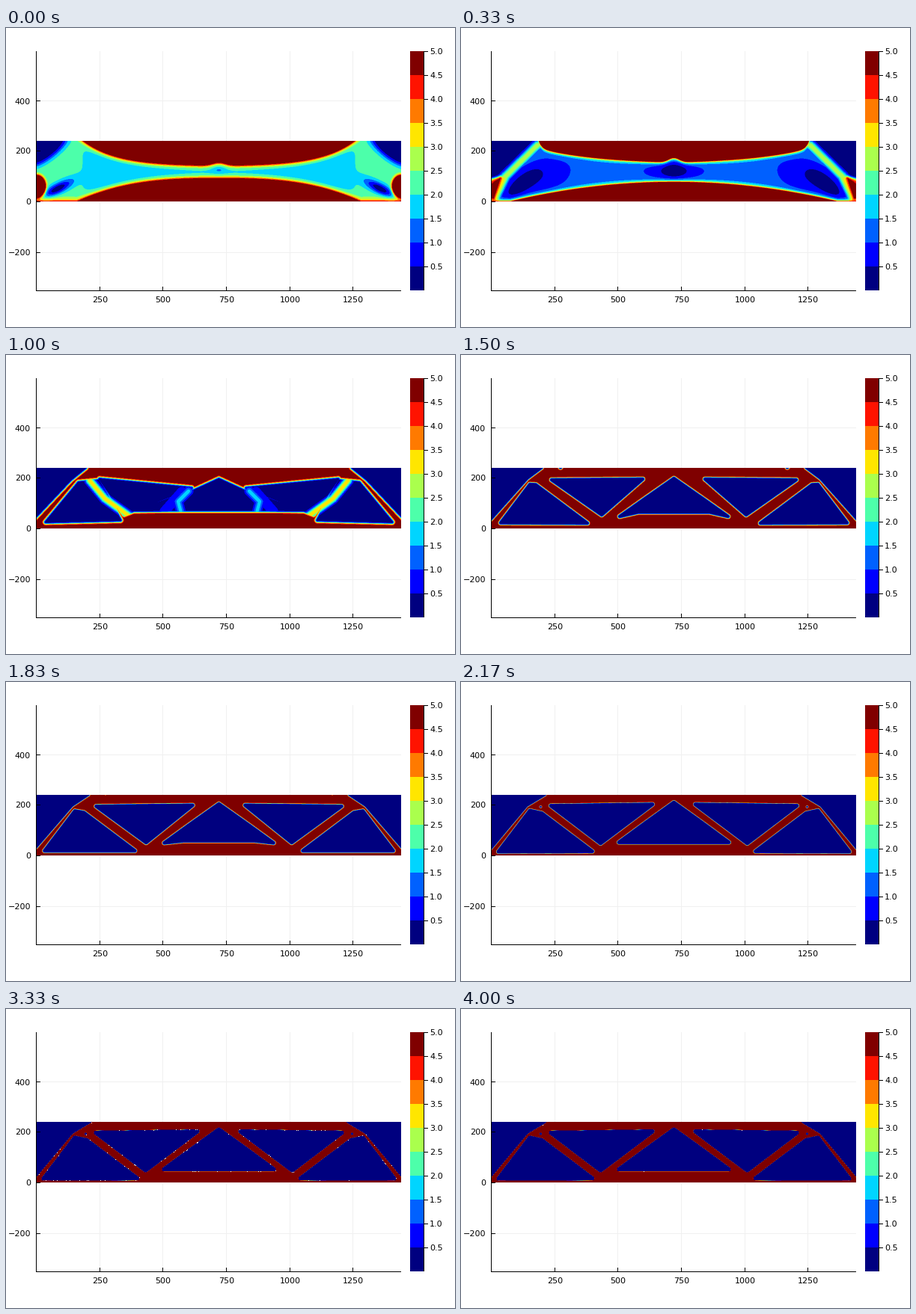
A matplotlib script for the animation above (4.17 s loop, 600 px wide and 400 px high).

```python
import numpy as np
import matplotlib.pyplot as plt
from matplotlib.animation import FuncAnimation

W, H, DPI = 600, 400, 100
PX = 72 / DPI                      # one pixel in points
LOOP, TICK, STEPS = 4170, 30, 25   # ms, ms, pictures per loop
LEFT, RIGHT, TOP, BOTTOM = 41, 528, 151, 232
MID = (LEFT + RIGHT) / 2
SS = 2                             # supersampling of the density field

plt.rcParams["font.family"] = "DejaVu Sans"
COLORS = plt.get_cmap("jet")(np.arange(10) / 9)[:, :3]

# left half of the beam; the right half is its mirror image
X, Y = np.meshgrid(LEFT + (np.arange(RIGHT - LEFT) + 0.5) / SS,
                   TOP + (np.arange((BOTTOM - TOP) * SS) + 0.5) / SS)


def line_dist(pts):
    best = np.full(X.shape, 1e9)
    for (ax, ay), (bx, by) in zip(pts[:-1], pts[1:]):
        dx, dy = bx - ax, by - ay
        t = ((X - ax) * dx + (Y - ay) * dy) / (dx * dx + dy * dy + 1e-9)
        t = np.clip(t, 0, 1)
        best = np.minimum(best, np.hypot(X - ax - t * dx, Y - ay - t * dy))
    return best


def hole(pts, rounding=0):
    """Signed distance to a polygon with rounded corners, negative inside."""
    ring = list(pts) + [pts[0]]
    inside = np.zeros(X.shape, bool)
    for (ax, ay), (bx, by) in zip(ring[:-1], ring[1:]):
        if ay != by:
            inside ^= ((ay > Y) != (by > Y)) & (X < ax + (Y - ay) * (bx - ax) / (by - ay))
    d = line_dist(ring)
    return np.where(inside, -d, d) - rounding


def dot(x, y, r):
    return np.hypot(X - x, Y - y) - r


def radius(cx, cy, rx, ry, deg=0):
    a = np.radians(deg)
    u = (X - cx) * np.cos(a) + (Y - cy) * np.sin(a)
    v = (Y - cy) * np.cos(a) - (X - cx) * np.sin(a)
    return np.hypot(u / rx, v / ry)


def blob(*args):
    return np.exp(-radius(*args) ** 2)


def ridge(pts, width):
    return np.exp(-(line_dist(pts) / width) ** 2)


def sigmoid(z):
    return 1 / (1 + np.exp(-np.clip(z, -60, 60)))


def logit(v):
    v = np.clip(v, 0.02, 4.98)
    return np.log(v / (5 - v))


def flanges(v, top, bottom, s):
    """Raise the density towards the top and bottom chords."""
    up = np.exp(np.clip((top - Y) / s, -30, 0.5))
    low = np.exp(np.clip((Y - np.minimum(bottom, 232)) / s, -30, 0.5))
    return v + np.maximum(4.5 - v, 0) * (up + low)


def first_density():
    v = 2.25 - 0.72 * sigmoid((X - 108) / 9)
    s = (((X - 41) / 46) ** 1.3 + ((Y - 151) / 38) ** 1.3) ** (1 / 1.3)
    v *= sigmoid((s - 0.85) / 0.07)
    v += (0.1 - v) * blob(69, 215, 23, 7, -28)
    v -= 0.4 * blob(MID, 190, 7, 4)
    top = 185 - 33 * np.exp((104 - X) / 45) - 4 * np.exp(-((X - MID) / 12) ** 2)
    bottom = 201 + 31 * ((MID - X) / 190) ** 2.8
    v = flanges(v, top, bottom, 3.3)
    return v + 5 * sigmoid((1 - radius(41, 212, 12, 15)) / 0.1)


def second_density():
    v = 1.25 - 0.5 * blob(MID, 191, 48, 14) - 0.7 * blob(MID, 191, 19, 11)
    v -= 0.62 * blob(108, 200, 42, 22, -20) + 0.9 * blob(79, 210, 30, 11, -40)
    v = np.maximum(v, 0.1)
    v *= sigmoid((X - LEFT + Y - TOP - 58) / 2)
    v = np.maximum(v, 2.9 * ridge([(44, 231), (60, 198), (102, 157)], 6.5))
    top = (182 - 19 * np.exp((112 - X) / 80) - 10 * np.exp((104 - X) / 4)
           - 6 * np.exp(-((X - MID) / 10) ** 2))
    bottom = 206 + 25 * ((MID - X) / 214) ** 2
    v = flanges(v, top, bottom, 1.9)
    return v + 4 * sigmoid(-hole([(36, 205), (52, 201), (42, 226)], 2) / 1.2)


# Corners of each opening while the struts appear, join up and settle.
OUTER = np.array([[(109, 152), (88, 169), (41, 219)],
                  [(110, 152), (90, 167), (41, 222)],
                  [(114, 152), (89, 167), (41, 224.5)]])
FOOT = np.array([[(53, 223.5), (97, 170.5), (124, 168), (153, 221)],
                 [(53, 224.5), (92, 173), (100, 173.5), (169, 225)],
                 [(50, 227), (92, 172), (108, 175.5), (175.5, 226.5)]])
UPPER = np.array([[(125, 166), (248, 178), (158, 213)],
                  [(121, 167), (243, 166), (188, 214)],
                  [(120, 165.5), (256, 163.7), (186.5, 216)]])
MIDDLE = np.array([[(MID, 166), (252, 181), (172, 208), (237, 207.5)],
                   [(MID, 165), (243, 194), (212, 216), (237, 210.3)],
                   [(MID, 161), (247, 188), (211, 214.5), (237, 214.5)]])


def pose(shape, p):
    i = min(int(p), 1)
    return shape[i] + (shape[i + 1] - shape[i]) * (p - i)


def truss(k, width):
    p = np.interp(k, [6, 9, 13], [0, 1, 2])
    outer = [tuple(c) for c in pose(OUTER, p)]
    middle = pose(MIDDLE, p)
    twin = middle[:0:-1] * (-1, 1) + (2 * MID, 0)
    g = np.minimum.reduce([
        hole([(10, 120), (outer[0][0], 120)] + outer + [(10, outer[2][1] + 36)]),
        hole(pose(FOOT, p), 2.7),
        hole(pose(UPPER, p), 2.7),
        hole(np.vstack([middle, twin]), 2.7),
        dot(133, 150, 3 - 4 * abs(p - 1)),
        dot(106.5, 167, 4 * p - 6.5),
    ])
    if p < 1:
        # half-dense struts and the haze beside them
        fade = 1 - p
        haze = np.maximum.reduce([
            (3.4 + p) * ridge([(112, 168), (132, 192), (164, 215)], 5.5),
            fade * 1.7 * ridge([(244, 182), (230, 196), (234, 211)], 6),
            fade * 0.85 * ridge([(235, 183), (212, 209)], 9),
        ])
        g = np.maximum(g, width * logit(haze))
    return np.clip(g, -12, 12)


def transition(k):
    return np.exp(np.interp(k, [0, 2, 6, 9, 13, 17],
                            np.log([4, 2, 0.8, 0.45, 0.24, 0.04])))


FIRST = transition(0) * logit(first_density())
SECOND = transition(2) * logit(second_density())


def field(k):
    if k <= 2:
        return FIRST + (SECOND - FIRST) * k / 2
    g = truss(max(k, 6), transition(max(k, 6)))
    return g if k >= 6 else SECOND + (g - SECOND) * (k - 2) / 4


def picture(k):
    g = field(k)
    level = np.clip((sigmoid(g / transition(k)) * 10).astype(int), 0, 9)
    full = np.hstack([level, level[:, ::-1]])
    rgb = COLORS[full].reshape(BOTTOM - TOP, SS, RIGHT - LEFT, SS, 3).mean(axis=(1, 3))
    if k > 13:
        # pale specks left over along the sharpening edges
        rng = np.random.default_rng(k)
        rim = np.hstack([g, g[:, ::-1]])[::SS, ::SS]
        chance = 0.14 * np.clip((22 - k) / 5, 0, 1) + 0.003
        spots = (np.abs(rim) < 0.5) & (rng.random(rim.shape) < chance)
        rgb[spots] = (1, 1, 0.9)
    return rgb


fig = plt.figure(figsize=(W / DPI, H / DPI), dpi=DPI, facecolor="white")
ax = fig.add_axes([0, 0, 1, 1])
ax.axis("off")


def line(x, y, color="black", z=3):
    ax.plot(x, y, color=color, lw=PX, zorder=z, solid_capstyle="butt", snap=False)


def label(x, y, text, ha):
    ax.text(x, y, text, ha=ha, va="center_baseline", fontsize=8)


SCALE = 487.5 / 1439
for value in range(250, 1251, 250):
    x = int(40.7 + (value - 1) * SCALE) + 0.5
    line([x, x], [31, 351], "#f0f0f0", 0)
    line([x, x], [351, 346])
    label(x, 362.7, str(value), "center")
for value in range(-200, 401, 200):
    y = int(191.75 - (value - 120.5) * SCALE) + 0.5
    line([41, 528], [y, y], "#f0f0f0", 0)
    line([41, 46], [y, y])
    label(33, y, str(value).replace("-", "\u2212"), "right")
line([40.5, 40.5], [31, 352])
line([40, 528], [351.5, 351.5])

for i, color in enumerate(COLORS):
    y = 351 - 32 * i
    ax.fill([540, 558, 558, 540], [y, y, y - 32, y - 32], color=color, lw=0)
    line([558, 564], [y - 31.5, y - 31.5])
    label(566, y - 32, f"{(i + 1) / 2:.1f}", "left")
line([558.5, 558.5], [31, 351])

PICTURES = [picture(k) for k in range(STEPS)]
beam = ax.imshow(PICTURES[0], extent=(LEFT, RIGHT, BOTTOM, TOP),
                 interpolation="nearest", aspect="auto", zorder=2)
ax.set_xlim(0, W)
ax.set_ylim(H, 0)


def draw(i):
    # pictures change six times a second; the last one stays a little longer
    k = int((i * TICK + 20) * 6 / 1000)
    beam.set_data(PICTURES[min(k, STEPS - 1)])
    return [beam]


anim = FuncAnimation(fig, draw, frames=LOOP // TICK, interval=TICK,
                     repeat=True, repeat_delay=0)
plt.show()
```
